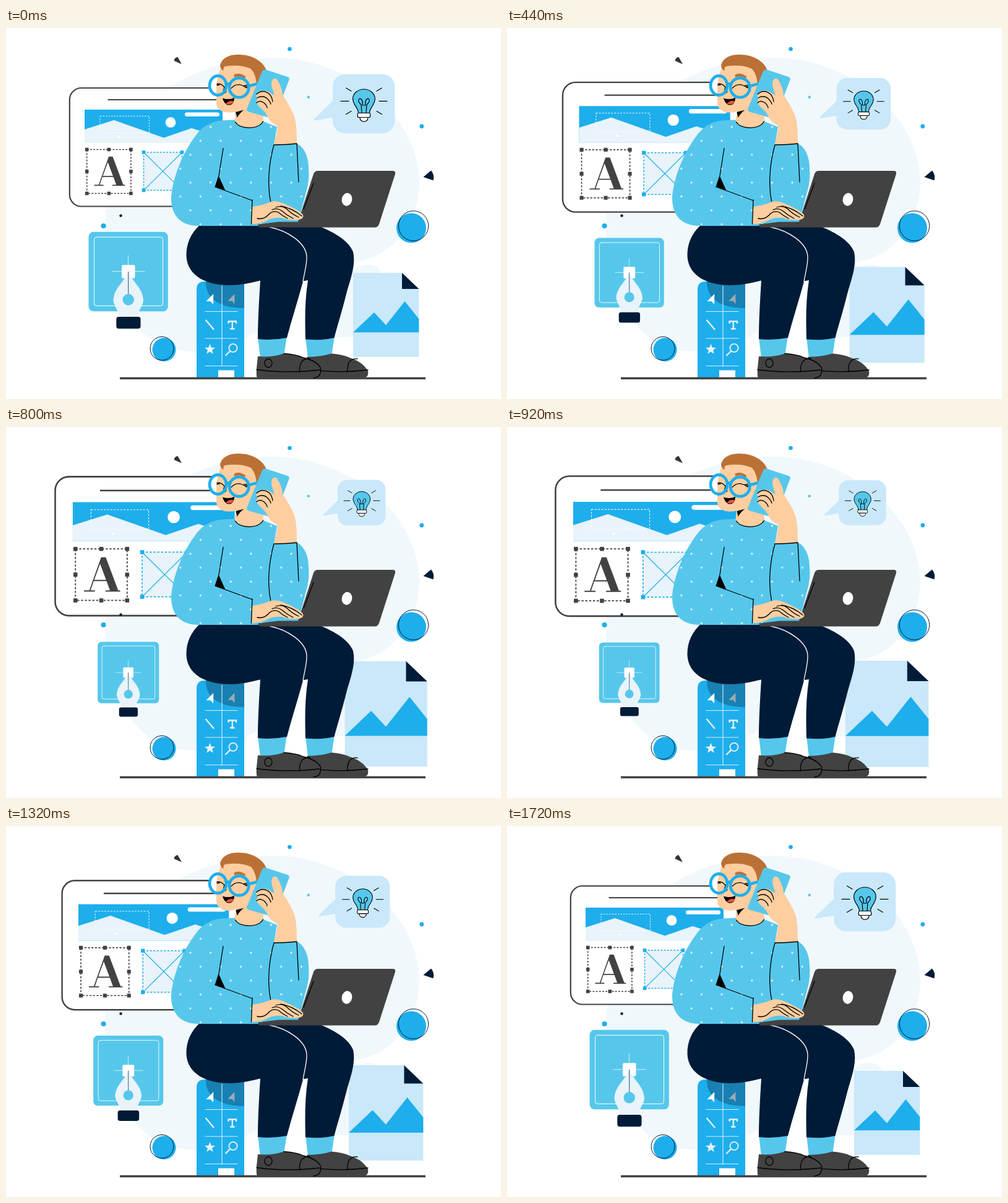
An HTML page for the animation above (1760 ms loop, 800x600 px).

```html
<!DOCTYPE html>
<html lang="en">
<head>
<meta charset="utf-8">
<title>Designer at work</title>
<style>
  html, body { margin: 0; width: 100%; height: 100%; overflow: hidden; background: #fff; }
  svg { display: block; width: 100%; height: 100%; }
  .sky { fill: #56c7eb; } .blue { fill: #1eaeec; } .ice { fill: #c9e8fa; } .pale { fill: #e8f3fa; }
  .navy { fill: #001b37; } .grey { fill: #424242; } .skin { fill: #fecea0; } .white { fill: #fff; }
  .hair { fill: #bb7136; } .mist { fill: #f0f8fc; }
  .ink, .chalk { fill: none; stroke: #000; stroke-width: 1.3; stroke-linecap: round; stroke-linejoin: round; }
  .chalk { stroke: #fff; }
</style>
</head>
<body>
<svg viewBox="0 0 800 600">
  <defs>
    <pattern id="dots" x="306.2" y="171.5" width="32.6" height="45" patternUnits="userSpaceOnUse">
      <g class="white"><circle cx="8.15" cy="11" r="1.4"/><circle cx="24.45" cy="33.5" r="1.4"/></g>
    </pattern>
  </defs>

  <!-- backdrop -->
  <path class="mist" d="M160 322C160 235 210 130 266 95C310 66 370 48 430 48C556 48 668 142 668 250C668 312 625 378 550 380C500 382 470 402 450 440C425 490 375 514 320 522C250 531 202 490 180 430C165 390 160 350 160 322Z"/>
  <path class="mist" d="M530 500C532 440 545 384 585 383C600 383 608 390 605 400L600 500Z"/>

  <g id="board">
    <rect class="white" x="102.8" y="97" width="269" height="191.5" rx="19" stroke="#424242" stroke-width="2.2"/>
    <path d="M164.5 116H352" stroke="#424242" stroke-width="2.1"/>
    <path class="blue" d="M127 132H350V186H127Z"/>
    <path class="pale" d="M127 164L174.500 149L255 177.500L300 162L350 178V186H127Z"/>
    <rect x="152" y="142.500" width="79.500" height="27" fill="none" stroke="#fff" stroke-width=".9" stroke-dasharray="2.500 2"/>
    <circle class="white" cx="266" cy="152.700" r="8.400"/>
    <rect class="white" x="289" y="136.500" width="56" height="6.500" rx="3.250"/>
    <circle cx="341" cy="139.700" r="1.500" fill="none" stroke="#b9def2" stroke-width=".7"/>
    <path class="white" d="M181 173L185.500 176.500L183 177L182 179Z"/>
    <rect x="130.700" y="196.500" width="71.200" height="71" fill="none" stroke="#424242" stroke-width="1.500" stroke-dasharray="3 2.200"/>
    <g id="darkGrips" class="grey"></g>
    <path class="grey" fill-rule="evenodd" role="img" aria-label="A" d="M166 208H172.500L189.500 253.600H192.300V255.300H172V253.600H178.200L173.600 241H155.800L151.500 253.600H157.500V255.300H142.500V253.600H149.800ZM156.500 239.200H172.900L164.600 217Z"/>
    <rect class="pale" x="222.500" y="201" width="62" height="61.500" stroke="#1eaeec" stroke-width="1.400" stroke-dasharray="3 2.200"/>
    <path d="M222.500 201L284.500 262.500M284.500 201L222.500 262.500" stroke="#1eaeec" stroke-width="1.100"/>
    <g id="blueGrips" class="blue"></g>
  </g>

  <g id="pen">
    <rect class="sky" x="133.500" y="329.800" width="128.300" height="128.500" rx="8"/>
    <rect class="chalk" x="142.500" y="338.300" width="111" height="111" rx="4" style="stroke-width:1"/>
    <path class="chalk" d="M197.500 368V395M171.500 393.700H224" style="stroke-width:1;stroke:#d8effa"/>
    <rect class="white" x="187" y="383.200" width="21.500" height="21.500" rx="2"/>
    <path class="pale" d="M197.700 391C202 411 221 418 222 441C221 450 214 456 213 466H182.500C181.500 456 174.500 450 173.500 441C174.500 418 193.500 411 197.700 391Z"/>
    <path d="M197.700 394V431" stroke="#35627f" stroke-width="1.100"/>
    <circle class="sky" cx="197.700" cy="439.300" r="9.200"/>
    <rect class="navy" x="178.300" y="467" width="39.200" height="19.200" rx="4"/>
  </g>

  <g id="picture">
    <path class="ice" d="M561 396H640L667.300 422V532H561Z"/>
    <path class="navy" d="M640 396L667.300 422H640Z"/>
    <path class="blue" d="M561 492.300L595 460L614 480.500L644.500 442L667.300 470.500V492.300Z"/>
  </g>

  <g id="bubble">
    <rect class="ice" x="528" y="74.700" width="100.300" height="95.500" rx="20"/>
    <path class="ice" d="M530 116L498.500 146.500Q495 150 500 149.400L530 144.500Z"/>
    <g class="ink" style="stroke-width:1.200">
      <path class="sky" d="M569.500 138C569.500 128 560.500 125 560.500 114.500A17.900 15.500 0 0 1 596.300 114.500C596.300 125 587.500 128 587.500 138Z"/>
      <path d="M575 137L574 124C567 118 570 112 574 115Q577 118 576 125M582 137L583 124C590 118 587 112 583 115Q580 118 581 125M576 125H581"/>
      <rect class="white" x="568.300" y="137.500" width="20.400" height="7" rx="2"/>
      <path class="white" d="M572 144.500H585Q585 151 578.500 151.300Q572 151 572 144.500Z"/>
      <path d="M541 118.300H554M603 118.300H616M549.500 97L558 102M599 102L607.500 97M549.500 139.500L558 134.500M599 134.500L607.500 139.500"/>
    </g>
  </g>

  <!-- loose ornaments -->
  <g class="blue">
    <circle cx="458.500" cy="34" r="3.300"/><circle class="sky" cx="488.800" cy="111.800" r="2.200"/>
    <circle cx="671.800" cy="159" r="3.400"/><circle cx="157.500" cy="320" r="4.100"/>
    <circle cx="655" cy="323.500" r="24"/><circle cx="255.500" cy="520.300" r="19"/>
  </g>
  <circle class="navy" cx="185.500" cy="303.500" r="2.200"/>
  <g fill="none" stroke="#001b37"><circle cx="658.500" cy="320" r="24.200"/><circle cx="252" cy="518.300" r="19"/></g>
  <path fill="#333" d="M271.500 53Q272.500 47.500 277.500 47L284 58.500Z"/>
  <path class="navy" d="M674.500 241L687 230.500Q693 237.500 690.500 246.500Z"/>

  <!-- stool -->
  <path class="blue" d="M308 566V423Q308 410 321 410H372Q385 410 385 423V566Z"/>
  <path fill="#1880b2" d="M323 410C322 438 346 453 385 453V410Z"/>
  <path class="chalk" d="M349 417V547M322 458.500H374M322 502H374M322 546.500H374" style="stroke-width:1.100;stroke:#d8f0fb"/>
  <path class="white" d="M335.300 430L323.500 442L330.500 442L335 447Z"/>
  <path fill="#9fabb3" d="M369.300 430L358.500 441.500L365.500 441.500L369.500 446.500Z"/>
  <g class="chalk" style="stroke:#e8f3fa;stroke-width:2.300;stroke-linecap:butt">
    <path d="M322.500 472L336 488"/>
    <path d="M359.500 478V474.500H372V478M365.800 474.500V486.500M362 486.500H369.600"/>
    <circle cx="367" cy="517.500" r="6.600" style="stroke-width:1.900"/><path d="M362.500 522L354.500 530"/>
  </g>
  <path id="star" class="pale"/>
  <path class="white" d="M343 553.500H369V566H343Z"/>

  <path d="M184 566.500H678" stroke="#424242" stroke-width="3.400"/>

  <!-- legs and shoes -->
  <path class="sky" d="M484 500L531 498L526 531L488 534Z"/>
  <path class="navy" d="M425 315H490C520 325 552 340 561 362C566 385 555 410 550 430C543 458 536 480 530.500 501Q510 506 484 503.500C483 470 483 440 488 408L470 411Z"/>
  <path class="grey" d="M486 532Q508 532 526 526.500Q545 528 555 533Q577 540 585 555Q587 566 575 566.500H490Z"/>
  <path class="ink" d="M503 554Q545 558 585 553M552 556C551 542 556 534 568 535"/>
  <path class="sky" d="M407 500L454 498L449 531L411 534Z"/>
  <path class="navy" d="M314 318C298 332 291 350 291.500 369C293 402 326 416 360 416C383 416 399 411 411 408.500C409 440 407 475 407 503Q430 505.500 454 501C462 470 472 440 480 410C483 395 487 385 486 370C481 348 460 330 426 318Z"/>
  <path class="chalk" d="M426 322C455 328 485 347 486 370C486.500 382 482 397 480 410"/>
  <path class="grey" d="M407 531Q430 533 449 526.500Q470 528 480 533Q502 538 508.500 550Q510 565 500 566.500H407Q404 566 405 550Z"/>
  <g class="ink">
    <path d="M405 552.500Q450 559 507 553M474.500 556C474 541 479 534 491 534.500M449 526.500Q470 528 480 533Q502 538 508.500 550Q510 565 497 566"/>
    <ellipse cx="424" cy="542" rx="6" ry="7"/>
  </g>

  <!-- head -->
  <ellipse class="white" cx="342.500" cy="93" rx="14" ry="16"/>
  <path class="skin" d="M348 62Q341 78 340 95V122C341 134 352 137.500 366 136.500L371.500 135L370 155Q390 172 416 156L413 60Q380 45 348 62Z"/>
  <path class="hair" d="M352 69Q346 67 346 60C350 47 362 43 376 43C398 43 416 54 421 69L405 96Q405 76 396 66Q378 58 354 62Q350 65 352 69Z"/>
  <path class="hair" d="M368.500 75.500Q377 71 387.500 78.500L386 81Q377 77 369 79.500Z"/>
  <path d="M350 113.500Q361 117 369 112.500C369 123 363 126 357 124Q352 121 350 113.500Z"/>
  <path fill="#f2543d" d="M355 122.500Q361 116 368 118.500Q365 126 355 122.500Z"/>
  <path class="ink" d="M364 97.500Q374 86 389 97M384.500 93.500L389.500 92.500M386.500 95.500L390 95M341 90.500Q348 89 353 96M341 92.500L345 92M355 93Q350 101 352 104Q354 106 356 103"/>
  <g fill="none" stroke="#1eaeec" stroke-width="4.700">
    <ellipse cx="342.500" cy="93" rx="13.400" ry="15.600"/><circle cx="376.700" cy="96.500" r="15.700"/>
    <path d="M356 92Q359 89 362 92M392 94L409 89.500"/>
  </g>

  <!-- jumper -->
  <path id="jumper" class="sky" d="M370 148.500Q374 161 393 161Q411 161 415.500 151L438 160L433 189L470 187C480 191 489 206 489 226C490 240 489 248 487 258L472 315L409 320H312C282 320 266 303 267 272C270 242 284 205 303 179Q321 151 350 149.500Z"/>
  <path id="spots" fill="url(#dots)"/>
  <path class="skin" d="M369.500 147L370.500 153Q377 161 393 161Q410 161 415.500 151L414 138L372 137Z"/>
  <path d="M371.500 136L384.500 132.500Q378 137 373.500 145Z"/>
  <path class="ink" d="M370.500 152Q376 161 393 161.300Q410 161 415.500 151"/>

  <!-- phone and raised hand -->
  <path class="sky" d="M420 67.500L455 79Q459 80.500 457.500 84L435 143Q433 147 429 146L392 135.500Q388 134 389.500 130L414 70Q416 66.500 420 67.500Z"/>
  <path class="skin" d="M433 189C436 175 440 163 438 158C428 153 425 148 422 142C418 132 403 125 405 119Q407 116 406 113Q402 109 407 105Q415 98 426 104L434 109C432 102 427 92 430 85Q433 79 438 83C443 91 447 101 447 108C454 119 463 133 467 146C470 160 470 175 470 187Z"/>
  <g class="ink">
    <path d="M405 107Q415 98 426 107Q430 112 431 119M406 113Q415 108 422 114Q427 119 428 123M405 121Q410 116 417 121Q422 126 422 129"/>
    <path d="M433 189Q452 189 470 187L473 249M433 189C426 214 421 250 428 283M351 194.500L344 239M338 257L398 279"/>
  </g>
  <path d="M343.500 238.500L337.500 257L354.500 263Z"/>

  <!-- laptop and typing hand -->
  <path class="grey" d="M504 231H625Q630 231 629 236L603 317Q601 322.500 596 322.500H410Q406 322 408 317.500L440 313.500H472L497 236Q499 231 504 231Z"/>
  <path class="ink" d="M497 251L481 293"/>
  <ellipse class="white" cx="551" cy="277.300" rx="8.300" ry="10.500" transform="rotate(12 551 277.300)"/>
  <path class="skin" d="M398 289Q418 286 428 281Q438 279 447 283C460 289 475 295 480 302Q482 308 474 310Q458 312 446 307Q430 306 421 312Q410 317 396.500 317Z"/>
  <path class="ink" d="M398 278L396.500 317M406 308C415 310 422 305 426 300Q432 295 440 298Q447 304 455 308M430 294Q438 290 446 296Q454 303 464 308M436 290Q446 286 454 293Q462 301 473 306M444 288Q462 291 478 304"/>
</svg>
<script>
  const $ = id => document.getElementById(id);

  const grips = (xs, ys, skipCentre) => xs.flatMap((x, i) => ys.map((y, j) =>
    skipCentre && i === 1 && j === 1 ? '' :
      `<rect x="${x - 2.8}" y="${y - 2.8}" width="5.6" height="5.6"/>`)).join('');
  $('darkGrips').innerHTML = grips([130.7, 166.3, 201.9], [196.5, 232, 267.5], true);
  $('blueGrips').innerHTML = grips([222.5, 284.5], [201, 262.5]);

  $('star').setAttribute('d', 'M' + Array.from({ length: 10 }, (_, i) => {
    const a = i * Math.PI / 5, r = i % 2 ? 3.8 : 9;
    return `${329.5 + r * Math.sin(a)} ${519.8 - r * Math.cos(a)}`;
  }).join('L') + 'Z');
  $('spots').setAttribute('d', $('jumper').getAttribute('d'));

  // Each part scales about its own centre.
  const parts = [
    { el: $('board'), x: 237, y: 192.8, to: 1.191 },
    { el: $('pen'), x: 197.7, y: 408, to: 0.75 },
    { el: $('picture'), x: 614.2, y: 464, to: 1.278 },
    { el: $('bubble'), x: 562.7, y: 122.4, to: 0.75 }
  ];
  const LOOP = 1760, STEP = 40, PEAK = 880, END = LOOP - STEP;

  function draw(ms) {
    const t = Math.floor((ms % LOOP) / STEP) * STEP;
    const p = t <= PEAK ? t / PEAK : (END - t) / (END - PEAK);
    for (const { el, x, y, to } of parts) {
      const s = 1 + (to - 1) * p;
      el.setAttribute('transform', `translate(${x} ${y}) scale(${s}) translate(${-x} ${-y})`);
    }
  }

  const start = performance.now();
  function tick() {
    draw(performance.now() - start);
    requestAnimationFrame(tick);
  }
  tick();
</script>
</body>
</html>
```
